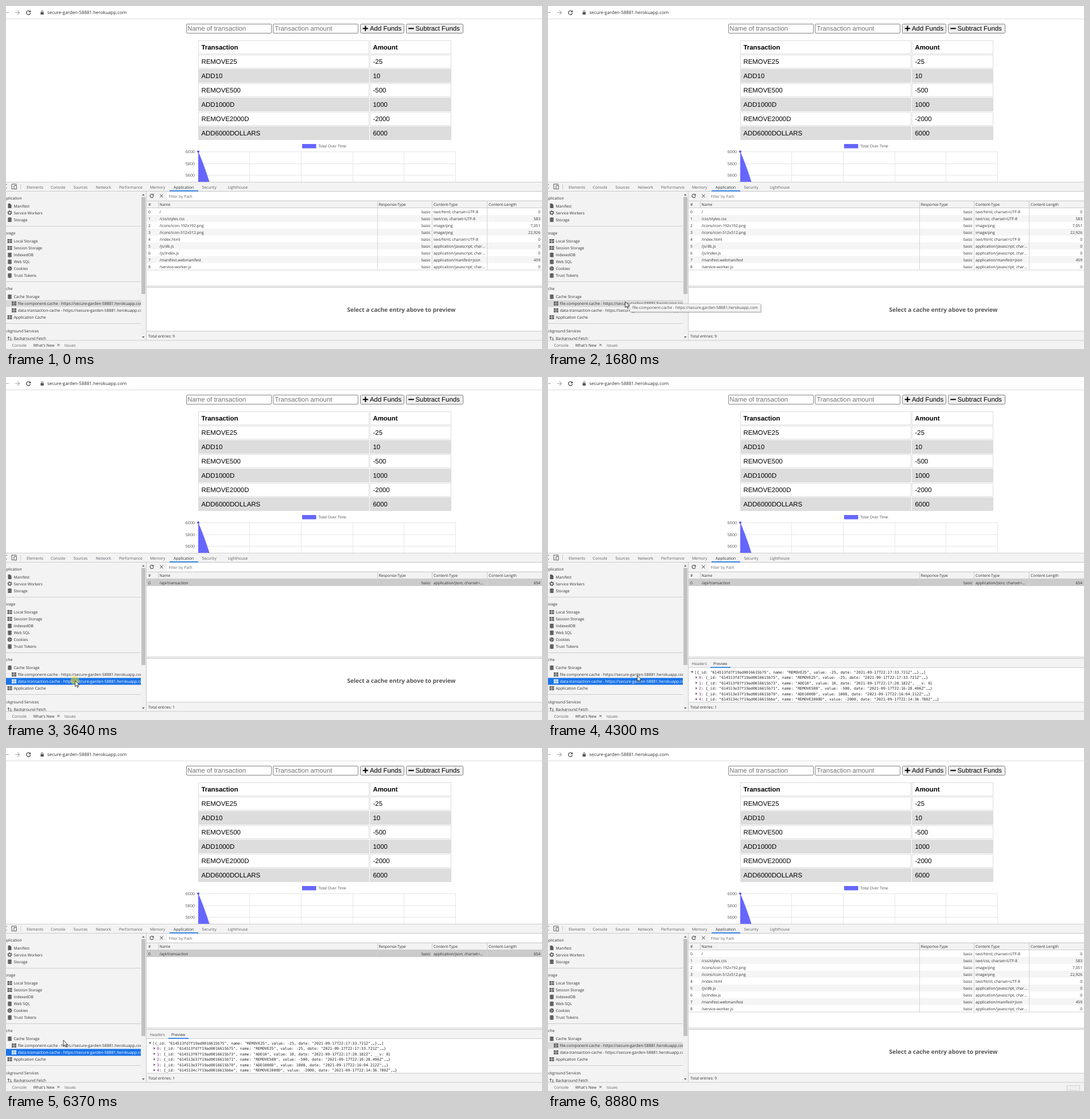
Write an HTML page that moves like this. It is 934x599 px and loops after 8.95 s.

```html
<!DOCTYPE html>
<html lang="en">
<head>
<meta charset="utf-8">
<title>Cache storage</title>
<style>
html, body { margin: 0; width: 100%; height: 100%; overflow: hidden; background: #fff; }
svg { display: block; width: 934px; height: 599px; }
text { font-family: "Open Sans", "Noto Sans", sans-serif; font-size: 6.75px; fill: #303030; text-rendering: geometricPrecision; white-space: pre; }
.page { font-family: "Liberation Sans", Arial, sans-serif; font-size: 11.4px; fill: #000; }
.chart { font-family: "Liberation Sans", Arial, sans-serif; font-size: 7px; fill: #666; }
.mono { font-family: "DejaVu Sans Mono", monospace; font-size: 6.5px; fill: #222; }
.hint { font-size: 10.1px; font-weight: 700; fill: #555; }
.tab { fill: #5a5e63; }
.end { text-anchor: end; }
.mid { text-anchor: middle; }
.row { --ink: #303030; --icon: #5a5a5a; }
.row.gray { --back: #dadada; }
.row.blue { --back: #1a73e8; --ink: #fff; --icon: #fff; }
.row .back { fill: var(--back, none); }
.row text { fill: var(--ink); }
.row .icon { fill: var(--icon); }
.icon { fill: #5a5a5a; }
</style>
</head>
<body>
<svg id="stage" viewBox="0 0 934 599" xmlns="http://www.w3.org/2000/svg"></svg>
<script>
const LOOP = 8950;
const HOST = "https://secure-garden-58881.herokuapp.com";
const FILE = "file-component-cache - " + HOST;
const DATA = "data-transaction-cache - " + HOST;

// ---- drawing helpers (text is placed by its vertical centre) ----
const rect = (x, y, w, h, fill, more = "") =>
  `<rect x="${x}" y="${y}" width="${w}" height="${h}" fill="${fill}" ${more}/>`;
const frame = (x, y, w, h, fill, line, r = 0) =>
  rect(x + .5, y + .5, w - 1, h - 1, fill, `stroke="${line}" rx="${r}"`);
const text = (x, y, s, cls = "", more = "") =>
  `<text x="${x}" y="${y + 2.6}" class="${cls}" ${more}>${s}</text>`;
const stroke = (d, color, w = 1) =>
  `<path d="${d}" fill="none" stroke="${color}" stroke-width="${w}"/>`;
const solid = (d, more = 'class="icon"') => `<path d="${d}" ${more}/>`;
const group = (id, body, more = "") => `<g id="${id}" ${more}>${body}</g>`;

const icons = {
  grid(x, y) {
    let d = "";
    for (let r = 0; r < 3; r++)
      d += `M${x} ${y - 3.4 + r * 2.5}h3.6v1.8h-3.6zM${x + 4.3} ${y - 3.4 + r * 2.5}h3.7v1.8h-3.7z`;
    return solid(d);
  },
  disk(x, y) {
    let d = "";
    for (let r = 0; r < 3; r++)
      d += `M${x + .5} ${y - 3 + r * 2.5}q3.5-1.6 7 0v1.4q-3.5 1.6-7 0z`;
    return solid(d);
  },
  file: (x, y) => solid(`M${x + 1} ${y - 4}h3.6l2.4 2.4v5.6h-6z`),
  gear: (x, y) => `<circle cx="${x + 4}" cy="${y}" r="2.5" fill="none" stroke="#5a5a5a" stroke-width="1.5"/>
    <circle cx="${x + 4}" cy="${y}" r="3.6" fill="none" stroke="#5a5a5a" stroke-width="1.2" stroke-dasharray="1.6 2.17"/>`,
  cookie: (x, y) => `<circle cx="${x + 4}" cy="${y}" r="3.8" class="icon"/>
    <g fill="#f3f3f3"><circle cx="${x + 2.8}" cy="${y - 1}" r=".8"/><circle cx="${x + 5.4}" cy="${y}" r=".8"/><circle cx="${x + 3.4}" cy="${y + 1.8}" r=".7"/></g>`,
  arrows: (x, y) => stroke(`M${x + 2} ${y + 3}v-6l-2 2m2-2l2 2M${x + 6} ${y - 2}v6l-2-2m2 2l2-2`, "#5a5a5a")
};
const reload = (x, y, r, w) =>
  stroke(`M${x + r * .8} ${y - r * .6}A${r} ${r} 0 1 0 ${x + r} ${y + .6}`, "#444", w) +
  solid(`M${x + r + .5} ${y - r - .4}v${r}h-${r}z`, 'fill="#444"');

// ---- browser bar ----
function browserBar() {
  return rect(0, 22, 934, 1, "#dcdcdc") +
    stroke("M5 11.5H-2", "#aaa", 1.1) +
    stroke("M16 11.5h7.5m-3.4-3.5l3.5 3.5l-3.5 3.5", "#aaa", 1.1) +
    reload(39, 11.5, 3.5, 1.2) +
    rect(60.3, 10.4, 5.4, 4.6, "#555", 'rx=".5"') +
    stroke("M61.5 10.5v-1a1.5 1.5 0 0 1 3 0v1", "#555", .9) +
    text(72, 11.7, HOST.slice(8), "", 'style="font-size:7.9px"');
}

// ---- web page ----
function page() {
  let s = "";
  const fields = [[314, 316.2, "Name of transaction"], [465, 468.2, "Transaction amount"]];
  for (const [x, start, label] of fields)
    s += frame(x, 31, 149, 17, "#fff", "#858585", 1.5) +
      text(start, 40.5, label, "page", 'style="fill:#757575"');
  s += frame(617, 31, 77, 17, "#efefef", "#858585", 2) + frame(697, 31, 100, 17, "#efefef", "#858585", 2);
  s += solid("M621.8 38.2h3.6v-3.6h2v3.6h3.6v2h-3.6v3.6h-2v-3.6h-3.6zM701.3 38.2h9.4v2h-9.4z", 'fill="#000"');
  s += text(634, 40.5, "Add Funds", "page") + text(713.5, 40.5, "Subtract Funds", "page");

  const rows = [["Transaction", "Amount"], ["REMOVE25", -25], ["ADD10", 10], ["REMOVE500", -500],
    ["ADD1000D", 1000], ["REMOVE2000D", -2000], ["ADD6000DOLLARS", 6000]];
  rows.forEach(([name, sum], i) => {
    const y = 60 + 25 * i, fill = i && i % 2 == 0 ? "#ddd" : "#fff";
    const bold = i ? "" : 'font-weight="700"';
    s += frame(335, y, 298, 24, fill, "#ddd") + frame(634, y, 142, 24, fill, "#ddd");
    s += text(340.5, y + 13.4, name, "page", bold) + text(639.5, y + 13.4, sum, "page", bold);
  });

  s += rect(516, 241, 24.5, 7.5, "#6666ff") + text(544, 244.3, "Total Over Time", "chart");
  [6000, 5800, 5600].forEach((v, i) => {
    const y = 254 + Math.round(i * 20.7);
    s += rect(330, y, 454, 1, "#e6e6e6") + text(329, y + .1, v, "chart end", 'style="font-size:7.3px"');
  });
  for (let i = 0; i < 6; i++) s += rect(Math.round(334.5 + i * 89.7), 254, 1, 54, "#e6e6e6");
  // the curve runs on below the tool panel, which covers it
  s += solid("M335 254C371 337 380 435 424.5 461H335z", 'fill="#6666ff"');
  return s + '<circle cx="335" cy="254.3" r="2" fill="#5555ee"/>';
}

// ---- developer tools ----
function sidebar() {
  let s = rect(0, 324, 244, 260, "#f3f3f3");
  for (const y of [384, 481, 554]) s += rect(0, y, 235, 1, "#ccc");
  const heads = { 335: "Application", 396.5: "Storage", 493.5: "Cache", 567: "Background Services" };
  for (const y in heads) s += text(-7.7, +y, heads[y]);
  const items = [[349, "file", "Manifest"], [361, "gear", "Service Workers"], [373, "disk", "Storage"],
    [410.5, "grid", "Local Storage"], [422.5, "grid", "Session Storage"], [434.5, "disk", "IndexedDB"],
    [446.5, "disk", "Web SQL"], [458.5, "cookie", "Cookies"], [470.5, "disk", "Trust Tokens"],
    [507.5, "disk", "Cache Storage"], [543.5, "grid", "Application Cache"], [580.5, "arrows", "Background Fetch"]];
  for (const [y, icon, label] of items) s += icons[icon](2.5, y) + text(13.5, y, label);
  const entry = (id, y, label) =>
    group(id, rect(0, y - 6, 235, 12, "none", 'class="back"') + icons.grid(10, y) +
      text(20.7, y, label, "", 'style="font-size:6.9px"'));
  s += entry("fileRow", 519.5, FILE) + entry("dataRow", 531.5, DATA);
  s = `<g clip-path="url(#side)">${s}</g>`;
  s += rect(235, 324, 9, 260, "#f1f1f1") + rect(236, 333.5, 7, 169.5, "#c1c1c1");
  s += solid("M237 331l2.3-2.8l2.3 2.8zM237 577l2.3 2.8l2.3-2.8z", 'fill="#606060"');
  return s + rect(244, 324, 1, 260, "#ccc");
}

function toolTabs() {
  let s = rect(0, 307, 934, 292, "#f3f3f3") + rect(0, 307, 934, 1, "#cfcfcf") + rect(0, 323, 934, 1, "#ccc");
  s += stroke("M-1 311.5h2.5m-2.5 8l2.5-2", "#5a5a5a");
  s += stroke("M13 319.5h-3v-8.5h8v1.5M14 313.5h4.3v6.3h-4.3z", "#5a5a5a") + rect(25, 311, 1, 9, "#ccc");
  const tabs = { Elements: 36, Console: 78, Sources: 117.5, Network: 156.5, Performance: 197, Memory: 251,
    Application: 292, Security: 341.5, Lighthouse: 386.5 };
  for (const name in tabs) s += text(tabs[name], 315.9, name, name == "Application" ? "" : "tab");
  return s + rect(285, 322, 50, 1.6, "#1a73e8");
}

const columns = [647, 742, 838];
function gridRow(i, name, type, size, fill) {
  const y = 359 + 12 * i;
  return rect(245, y - 6, 689, 12, fill) + text(248, y, i) + text(267.5, y, name) +
    text(740, y, "basic", "end") + text(745, y, type) + text(931, y, size, "end") +
    columns.map(x => rect(x, y - 6, 1, 12, "#d4d4d4")).join("");
}

function mainPanel() {
  let s = rect(245, 324, 689, 260, "#fff") + rect(245, 324, 689, 16, "#f3f3f3") + rect(281, 325, 653, 14, "#fff");
  s += reload(254, 331.5, 3, 1.1) + stroke("M268.2 328.8l5.4 5.4m0-5.4l-5.4 5.4", "#444", 1);
  s += text(283.5, 332, "Filter by Path", "", 'style="fill:#666"');
  s += rect(245, 340, 689, 13, "#f3f3f3") + rect(245, 340, 689, 1, "#ccc") + rect(245, 352, 689, 1, "#ccc");
  s += text(248, 346.8, "#") + text(267.5, 346.8, "Name") + text(649.5, 346.8, "Response-Type") +
    text(745, 346.8, "Content-Type") + text(841, 346.8, "Content-Length");
  for (const x of [265, ...columns]) s += rect(x, 341, 1, 12, "#ccc");
  s += rect(245, 489, 689, 3, "#f3f3f3") + rect(245, 488.5, 689, 1, "#ccc") + rect(245, 491, 689, 1, "#ccc");
  return s + rect(245, 567.5, 689, 17, "#f3f3f3") + rect(245, 567.5, 689, 1, "#ccc");
}

function fileList() {
  const html = "text/html; charset=UTF-8", js = "application/javascript; char…";
  const rows = [["/", html, "0"], ["/css/styles.css", "text/css; charset=UTF-8", "583"],
    ["/icons/icon-192x192.png", "image/png", "7,051"], ["/icons/icon-512x512.png", "image/png", "22,926"],
    ["/index.html", html, "0"], ["/js/db.js", js, "0"], ["/js/index.js", js, "0"],
    ["/manifest.webmanifest", "application/manifest+json", "459"], ["/service-worker.js", js, "0"]];
  return rows.map((r, i) => gridRow(i, ...r, i % 2 ? "#f5f5f5" : "#fff")).join("") +
    rect(245, 460.5, 689, 1, "#d4d4d4") + text(248, 576, "Total entries: 9");
}

function preview() {
  let s = rect(245, 492, 689, 15.5, "#f3f3f3") + rect(245, 507, 689, 1, "#ccc") + rect(283, 506.4, 35, 1.6, "#1a73e8");
  s += text(250.5, 500, "Headers", "tab") + text(288, 500, "Preview");
  const record = (id, name, value, time, tail = "…") =>
    `{_id: "614513${id}", name: "${name}", value: ${value}, date: "2021-09-17T22:${time}Z",${tail}}`;
  const rows = [record("fd7f19ad0016615b75", "REMOVE25", -25, "17:33.721"),
    record("f07f19ad0016615b73", "ADD10", 10, "17:20.182", " __v: 0"),
    record("e37f19ad0016615b71", "REMOVE500", -500, "16:28.496"),
    record("e37f19ad0016615b70", "ADD1000D", 1000, "16:04.212"),
    record("4c7f19ad0016615b6e", "REMOVE2000D", -2000, "14:36.780")];
  s += solid("M249 513.7h4.4l-2.2 3.4z") + text(255.3, 515, `[${rows[0]},…]`, "mono");
  rows.forEach((row, i) => {
    const y = 524.6 + 9.5 * i;
    s += solid(`M257.3 ${y - 2.2}v4.4l3-2.2z`) +
      text(263, y, `<tspan fill="#881391">${i}</tspan>: ${row}`, "mono");
  });
  return s;
}

function drawer() {
  return rect(0, 584, 934, 15, "#f3f3f3") + rect(0, 583.5, 934, 1, "#ccc") +
    text(10.5, 592.2, "Console", "tab") + text(47.5, 592.2, "What's New") +
    stroke("M89.5 590l3.8 3.8m0-3.8l-3.8 3.8", "#444", .9) + text(102, 592.2, "Issues", "tab");
}

const tip = (id, x, y, w, label) => group(id,
  rect(x + 1.2, y + 1.5, w, 15, "#000", 'opacity=".18" rx="1.5"') +
  frame(x, y, w, 15, "#f4f4f4", "#c4c4c4", 1) +
  text(x + 5, y + 7.3, label, "", 'style="font-size:6.87px;fill:#4a4a4a"'));

const stage = document.getElementById("stage");
stage.innerHTML =
  '<clipPath id="side"><rect x="0" y="324" width="235" height="260"/></clipPath>' +
  page() + browserBar() + toolTabs() + sidebar() + mainPanel() +
  group("files", fileList()) +
  group("hint", text(689, 531.2, "Select a cache entry above to preview", "hint mid")) +
  group("single", gridRow(0, "/api/transaction", "application/json; charset=…", "654", "#cbcbcb") +
    text(248, 576, "Total entries: 1")) +
  group("preview", preview()) + drawer() +
  tip("tipA", 142, 519.5, 229, FILE) + tip("tipB", 128, 530.5, 228, FILE) + tip("tipC", 128, 532.5, 232, DATA) +
  group("stop", frame(904, 589, 23, 14, "#f0f0f0", "#cecece") + text(907.5, 598, "Stop", "", 'style="fill:#c2c2c2"')) +
  group("pointer", '<circle id="press" r="7.4" fill="#ffe600" opacity=".5"/>' +
    solid("M.6.2V10.6L3 8.4L4.6 12L6.2 11.3L4.6 7.8H7.9z", 'fill="#fff" stroke="#111" stroke-width=".8"'));

// ---- motion ----
const path = [[530, 921, 592], [740, 800, 540], [950, 520, 485], [1130, 320, 472], [1410, 168, 483],
  [1480, 156, 494], [1620, 134, 516], [1940, 134, 516], [2220, 124, 521], [2430, 117, 525], [2640, 120, 528.5],
  [2710, 120, 528.5], [2780, 120, 530], [4090, 120, 530], [4160, 128, 527], [4300, 155, 521], [4440, 300, 536],
  [4580, 430, 541], [4780, 620, 538], [4990, 688, 531], [5070, 690, 531], [5270, 685, 531], [5740, 685, 531],
  [5950, 500, 521], [6230, 150, 502], [6370, 99.5, 510], [6580, 84, 517], [7170, 84, 517], [7310, 250, 530],
  [7450, 640, 552], [7590, 866, 564], [7650, 880, 570], [7860, 905, 584], [8140, 911, 599]];
const moves = [0, 530, 1480, 2010, 2780, 4160, 5070, 5810, 6730, 7240, 7650];
const TICK = 70;

// The pointer is sampled once per tick within each move.
function pointerAt(t) {
  const start = moves.filter(m => m <= t).pop();
  const held = start + Math.floor((t - start) / TICK) * TICK;
  const i = path.findIndex(p => p[0] > held);
  if (i < 1) return path[i < 0 ? path.length - 1 : 0].slice(1);
  const [t0, x0, y0] = path[i - 1], [t1, x1, y1] = path[i];
  const k = (held - t0) / (t1 - t0);
  return [x0 + (x1 - x0) * k, y0 + (y1 - y0) * k];
}

const el = id => document.getElementById(id);
const show = (id, on) => el(id).setAttribute("display", on ? "inline" : "none");
const within = (t, a, b) => t >= a && t < b;

function draw(t) {
  const data = within(t, 3640, 6730), full = within(t, 3700, 6730);
  show("files", !data);
  show("single", data);
  show("hint", !full);
  show("preview", full);
  el("fileRow").setAttribute("class", "row " + (data ? "" : within(t, 6730, 8740) ? "blue" : "gray"));
  el("dataRow").setAttribute("class", "row " + (data ? "blue" : ""));
  show("tipA", within(t, 1670, 2010));
  show("tipB", within(t, 2640, 2780));
  show("tipC", within(t, 2780, 3570));
  show("press", within(t, 3570, 3960) || within(t, 6650, 7240));
  show("pointer", within(t, 530, 8140));
  el("pointer").setAttribute("transform", `translate(${pointerAt(t).join(" ")})`);
  el("stop").setAttribute("opacity", t < 8740 ? 0 : t < 8810 ? .3 : t < 8880 ? .65 : 1);
}

const begin = performance.now();
function loop() {
  draw((performance.now() - begin) % LOOP);
  requestAnimationFrame(loop);
}
loop();
</script>
</body>
</html>
```
